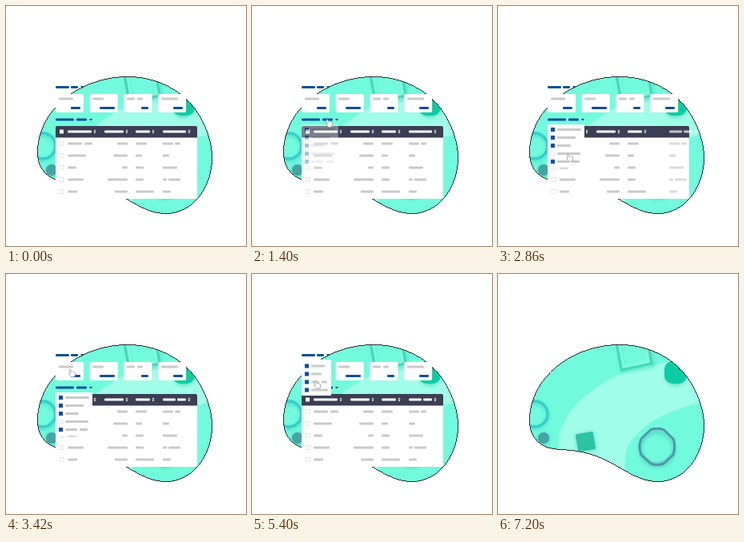
These frames come from a looping animation (300 px wide and 300 px high, 7.22 s). An HTML page:

```html
<!DOCTYPE html>
<html lang="en">
<head>
<meta charset="utf-8">
<title>Dashboard filters</title>
<style>
html, body { margin: 0; width: 100%; height: 100%; overflow: hidden; background: #fff; }
svg { display: block; width: 100vw; height: 100vh; }

.anim { animation: 7220ms linear infinite; }
#ui { animation-name: ui; }
#cursor { animation-name: cursor; }
#columnPanel { animation-name: columnPanel; }
#cardPanel { animation-name: cardPanel; }
#oldColumn { animation-name: oldColumn; }
#newColumn { animation-name: newColumn; }
#columnPanel .toggle { animation-name: columnTick; }
#cardPanel .toggle { animation-name: cardTick; }
#card2 { animation-name: dropCard; }
#card3 { animation-name: shiftCard; }

@keyframes ui {
  0%, 99.71% { opacity: 1; }
  99.72%, 100% { opacity: 0; }
}
@keyframes cursor {
  0%, .277% { transform: translate(140px, 205px); opacity: 0; animation-timing-function: cubic-bezier(.4, 0, .4, 1); }
  12.465%, 25.208% { transform: translate(92px, 141px); opacity: 1; animation-timing-function: ease-in-out; }
  30.471%, 43.767% { transform: translate(85px, 184px); animation-timing-function: cubic-bezier(.4, 0, .4, 1); }
  49.861%, 63.989% { transform: translate(76px, 100px); animation-timing-function: ease-in-out; }
  74.792%, 86.15% { transform: translate(77px, 133px); opacity: 1; animation-timing-function: ease-in-out; }
  94.183%, 100% { transform: translate(140px, 205px); opacity: 0; }
}
@keyframes columnPanel {
  0%, 18.006% { opacity: 0; }
  22.161%, 52.909% { opacity: 1; }
  58.172%, 100% { opacity: 0; }
}
@keyframes cardPanel {
  0%, 52.909% { opacity: 0; }
  58.172%, 86.15% { opacity: 1; }
  94.183%, 100% { opacity: 0; }
}
@keyframes columnTick {
  0%, 33.518% { opacity: 1; }
  37.396%, 100% { opacity: 0; }
}
@keyframes cardTick {
  0%, 77.839% { opacity: 1; }
  81%, 100% { opacity: 0; }
}
@keyframes oldColumn {
  0%, 33.518% { opacity: 1; }
  37.396%, 100% { opacity: 0; }
}
@keyframes newColumn {
  0%, 33.518% { transform: translateX(58px); opacity: 0; animation-timing-function: ease-in-out; }
  43.49%, 100% { transform: none; opacity: 1; }
}
@keyframes dropCard {
  0%, 77.839% { opacity: 1; }
  81%, 100% { opacity: 0; }
}
@keyframes shiftCard {
  0%, 77.839% { transform: none; animation-timing-function: ease-in-out; }
  83.102%, 100% { transform: translateX(-42.7px); }
}
</style>
</head>
<body>
<svg viewBox="0 0 300 300" xmlns="http://www.w3.org/2000/svg">
  <defs>
    <path id="blob" d="M152 88.5C185 88.5 212 102 230 121C248 141 257.5 168 257.5 190C257.5 226 234 259.5 200 259.5C170 259.5 150 236 118 226C104 221 88 220 73 219C52 217 39.5 204 39.5 183C39.5 130 92 88.5 152 88.5Z"/>
    <clipPath id="inside"><use href="#blob"/></clipPath>
    <filter id="soft" x="-30%" y="-30%" width="160%" height="160%"><feGaussianBlur stdDeviation="2"/></filter>
  </defs>

  <use href="#blob" fill="#71fbdc"/>
  <g clip-path="url(#inside)">
    <path fill="#9ffde8" d="M76 224C72 182 100 155 140 131C165 118 190 117 212 109L262 98L256 160C220 168 172 187 160 222L158 246Z"/>
    <g fill="none">
      <path stroke="#35cfb0" stroke-width="4" opacity=".5" filter="url(#soft)" d="M150 84L156 122L194 115L188 80"/>
      <path stroke="#41d5b8" stroke-width="2.5" d="M147.500 84L154 120L192 112L187 80"/>
      <path stroke="#8df5df" stroke-width="2" d="M151 84L157 116L188 109L183 80"/>
      <circle cx="46" cy="177" r="16" stroke="#2fc4b9" stroke-width="4" opacity=".5" filter="url(#soft)"/>
      <circle cx="46" cy="175" r="16" stroke="#35cfcd" stroke-width="3.500"/>
      <circle cx="199" cy="219" r="21" stroke="#3ab5a5" stroke-width="4" opacity=".5" filter="url(#soft)"/>
      <circle cx="199" cy="216" r="20" stroke="#67dfd4" stroke-width="3"/>
      <path stroke="#4d98aa" stroke-width="3" stroke-linejoin="round" d="M191 194.500Q199 192 207 194.500L219 206Q222.500 215 219 226L207 237Q199 240 191 237L179 226Q175 216 179 206Z"/>
    </g>
    <circle cx="222" cy="126" r="14" fill="#2bc9a8" opacity=".5" filter="url(#soft)"/>
    <rect x="208" y="109" width="28" height="28" rx="10" fill="#0acda5"/>
    <circle cx="57" cy="206" r="8" fill="#35b7a8" opacity=".5" filter="url(#soft)"/>
    <circle cx="57" cy="205" r="7" fill="#43a4a5"/>
    <rect x="98" y="199" width="23" height="23" rx="2" fill="#2fc3a6" opacity=".6" filter="url(#soft)" transform="rotate(-10 109.500 210)"/>
    <rect x="98.500" y="198.500" width="22" height="22" rx="1.500" fill="#2ec2a5" transform="rotate(-10 109.500 209.500)"/>
  </g>
  <use href="#blob" fill="none" stroke="#000" stroke-width=".8" shape-rendering="crispEdges"/>

  <g id="ui" class="anim">
    <g id="titles"></g>
    <g id="cards"></g>
    <g id="table"></g>
    <g id="columnPanel" class="anim"></g>
    <g id="cardPanel" class="anim"></g>
    <g id="cursor" class="anim">
      <path fill="#fff" stroke="#8c8c96" stroke-width=".7" stroke-linejoin="round" d="M1 1.200Q2 .2 2.800 1.200L3.800 4L4.800 3.500L5.600 4L6.500 3.600L7.200 4.300L8 4.400L8.600 7L8 9.800L4 10.500L.7 7.200Q.5 6.200 1.600 6.300L2.200 6.600Z"/>
    </g>
  </g>
</svg>
<script>
const BLUE = '#0b509f', GREY = '#cacaca', NAVY = '#3b3e54', WHITE = '#fff';
const rowY = [172, 187, 202, 217, 232];
const byId = id => document.getElementById(id);

function add(parent, tag, attrs) {
  const node = document.createElementNS('http://www.w3.org/2000/svg', tag);
  for (const key in attrs) node.setAttribute(key, attrs[key]);
  return parent.appendChild(node);
}

const box = (parent, x, y, width, height, fill, rx = 0) =>
  add(parent, 'rect', { x, y, width, height, fill, rx });

// Each pair in spans is a left and right edge.
function bars(parent, y, spans, fill = GREY) {
  for (let i = 0; i < spans.length; i += 2)
    box(parent, spans[i], y - 1.5, spans[i + 1] - spans[i], 3, fill, 1.3);
}

const caret = (parent, x, y) =>
  add(parent, 'path', { d: `M${x - 2} ${y - 1}h4l-2 2.500z`, fill: '#123763' });

const sorter = (parent, x) =>
  add(parent, 'path', { d: `M${x - 1.5} 156.500l1.500 -2l1.500 2zm0 1h3l-1.500 2z`, fill: WHITE });

const emptyBox = (parent, x, y) =>
  add(parent, 'rect', { x: x - 2.5, y: y - 2.5, width: 5, height: 5, fill: WHITE, stroke: '#dadada', 'stroke-width': .7 });

function column(parent, header, sortX, cells) {
  bars(parent, 157, header, WHITE);
  sorter(parent, sortX);
  cells.forEach((spans, i) => bars(parent, rowY[i], spans));
}

function panel(id, width, top, height, firstY, items, toggled) {
  const group = byId(id);
  box(group, 62, top, width, height, WHITE, 1);
  items.forEach((spans, i) => {
    const y = firstY + i * 10;
    emptyBox(group, 68.5, y);
    const tick = box(group, 66, y - 2.5, 5, 5, BLUE, .5);
    if (i === toggled) tick.setAttribute('class', 'anim toggle');
    bars(group, y, spans);
  });
}

const titles = byId('titles');
bars(titles, 101.5, [62, 79, 81, 90], BLUE);
caret(titles, 95, 101);
bars(titles, 142, [62, 85, 88, 101], BLUE);
caret(titles, 106, 142);

[
  [[66, 84], [81, 93]],
  [[108, 122], [117, 136]],
  [[151, 161, 164, 171], [169, 178]],
  [[194, 215], [209, 221]]
].forEach(([label, value], i) => {
  const card = add(byId('cards'), 'g', { id: 'card' + i, class: 'anim' });
  box(card, 62 + i * 42.7, 110, 35, 23, WHITE, 2);
  bars(card, 116, label);
  bars(card, 127.5, value, BLUE);
});

const table = byId('table');
box(table, 62, 150, 177, 91, WHITE, 2);
add(table, 'path', { d: 'M62 164.500V152q0 -2 2 -2H237q2 0 2 2V164.500z', fill: NAVY });
box(table, 67, 154.5, 5, 5, WHITE, .5);
rowY.forEach(y => emptyBox(table, 69.5, y));
column(table, [77, 107], 111, [[77, 95, 98, 108], [77, 100], [77, 88], [77, 97], [77, 89]]);
column(table, [123, 147], 151, [[139, 152], [134, 152], [145, 152], [127, 152], [136, 152]]);
column(table, [162, 180], 184, [[162, 176], [162, 170], [162, 172], [162, 172], [162, 185]]);

const lastCells = [[196, 209, 211, 218], [196, 204], [196, 214], [196, 201, 203, 218], [196, 206]];
column(add(table, 'g', { id: 'oldColumn', class: 'anim' }), [196, 225], 229, lastCells);
column(add(table, 'g', { id: 'newColumn', class: 'anim' }), [196, 212, 214, 225], 229, lastCells);

panel('columnPanel', 46, 148, 54, 154.5,
  [[74, 104], [74, 97], [74, 91], [74, 103], [74, 89, 92, 102]], 3);
panel('cardPanel', 37, 107, 45, 115,
  [[74, 91], [74, 87], [74, 84, 87, 94], [74, 95]], 2);
</script>
</body>
</html>
```
